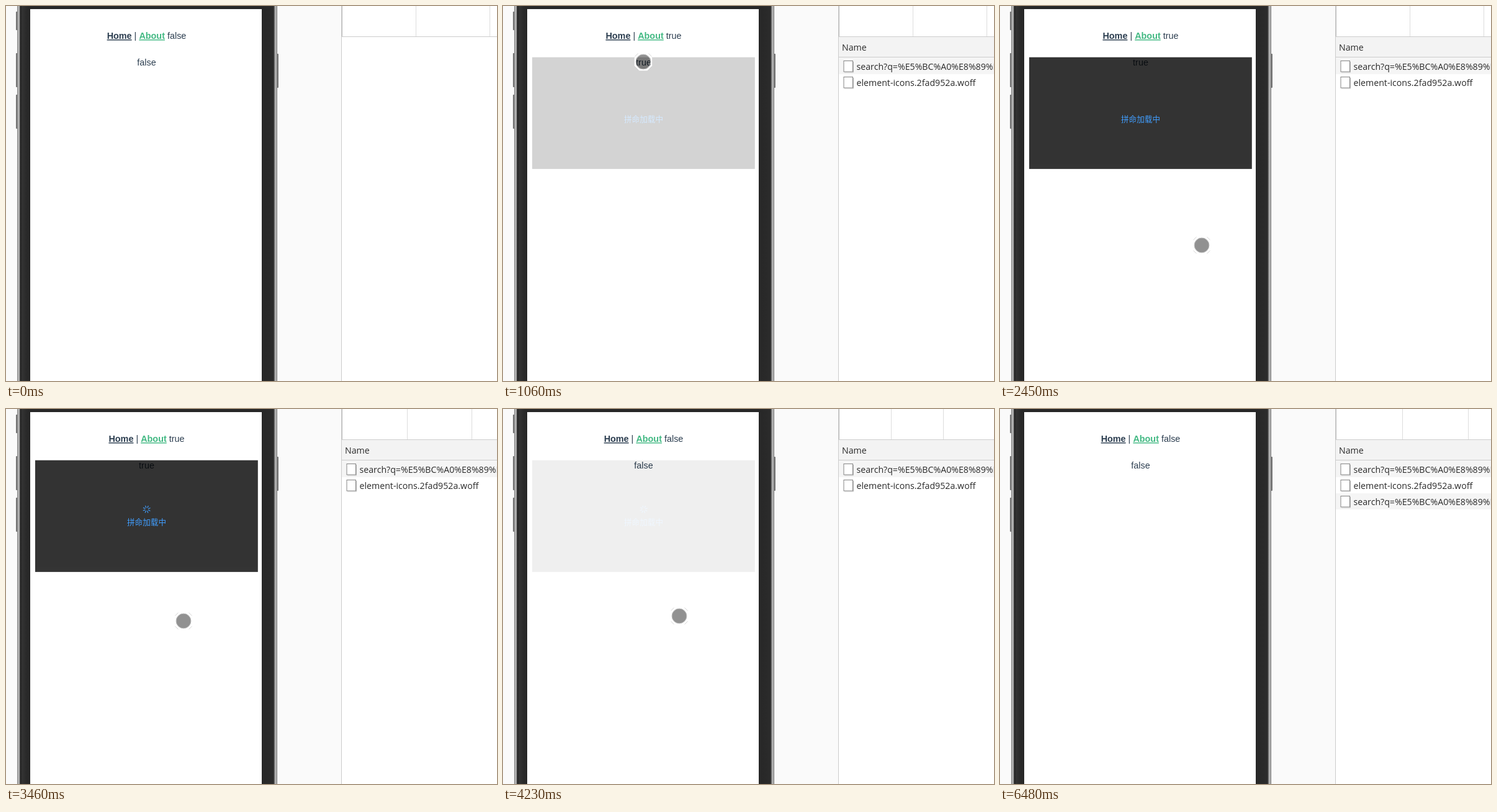
Write an HTML page that moves like this. It is 791 px wide and 605 px high and loops after 8270 ms.

```html
<!DOCTYPE html>
<html lang="en">
<head>
<meta charset="utf-8">
<title>Loading state demo</title>
<style>
  html, body { margin: 0; width: 100%; height: 100%; overflow: hidden; background: #fff; }
  svg { display: block; width: 791px; height: 605px; }
  .page { font: 14.4px "Liberation Sans", Arial, sans-serif; fill: #2c3e50; text-anchor: middle; }
  .link { font-weight: bold; text-decoration: underline; }
  .about { fill: #42b983; }
  .wait { font: 12.6px "Noto Sans CJK SC", "Noto Sans CJK", sans-serif; fill: #409eff; text-anchor: middle; }
  .list { font: 14.2px "Open Sans", "Noto Sans", sans-serif; fill: #2a2a2a; }
</style>
</head>
<body>
<svg viewBox="0 0 791 605">
  <defs>
    <linearGradient id="left">
      <stop offset="0" stop-color="#6e6e6e"/><stop offset=".07" stop-color="#b4b4b4"/>
      <stop offset=".18" stop-color="#a8a8a8"/><stop offset=".23" stop-color="#222"/>
      <stop offset=".4" stop-color="#333"/><stop offset=".65" stop-color="#2b2b2b"/>
      <stop offset="1" stop-color="#252525"/>
    </linearGradient>
    <linearGradient id="right">
      <stop offset="0" stop-color="#272727"/><stop offset=".76" stop-color="#2b2b2b"/>
      <stop offset=".8" stop-color="#555"/><stop offset=".86" stop-color="#aaa"/>
      <stop offset=".94" stop-color="#b4b4b4"/><stop offset="1" stop-color="#5a5a5a"/>
    </linearGradient>
    <g id="file">
      <rect x="549" y="5.5" width="14.5" height="17.5" fill="#fff" stroke="#858585"/>
      <path d="M550 24h14.5V7" fill="none" stroke="#bbb"/>
    </g>
  </defs>

  <rect width="540" height="605" fill="#fafafa"/>
  <g fill="#777">
    <rect x="16" y="9" width="4" height="30" rx="1"/>
    <rect x="16" y="76" width="4" height="55" rx="1"/>
    <rect x="16" y="143" width="4" height="55" rx="1"/>
    <rect x="434" y="77" width="5" height="55" rx="1"/>
  </g>
  <rect x="18" width="21" height="605" fill="url(#left)"/>
  <rect x="412" width="25" height="605" fill="url(#right)"/>
  <rect x="38" width="375" height="5" fill="#272727"/>
  <rect x="39" y="5" width="373" height="600" fill="#fff"/>

  <g class="page">
    <text x="226.5" y="53"><tspan class="link">Home</tspan> | <tspan class="link about">About</tspan> <tspan class="flag">false</tspan></text>
    <text x="226.5" y="96" class="flag">false</text>
  </g>
  <g id="mask">
    <rect x="47" y="82.7" width="358.8" height="180.2" fill="#000" fill-opacity=".8"/>
    <path id="spinner" stroke="#409eff" stroke-width="1.2" stroke-linecap="round"/>
    <text class="wait" x="226.5" y="187">拼命加载中</text>
  </g>

  <path d="M540.5 0V605M541 49.5H791" stroke="#ccc"/>
  <path d="M541.5 0V49" stroke="#bbb"/>
  <path id="grid" stroke="#ddd"/>

  <g id="list" class="list">
    <rect x="541" y="50" width="250" height="32" fill="#f3f3f3"/>
    <path d="M541 82.5H791" stroke="#ccc"/>
    <text x="546" y="72">Name</text>
    <rect x="541" y="83" width="250" height="27" fill="#f5f5f5"/>
    <use href="#file" y="83"/>
    <text x="569.5" y="103">search?q=%E5%BC%A0%E8%89%BA</text>
    <use href="#file" y="109"/>
    <text x="569.5" y="129">element-icons.2fad952a.woff</text>
    <g id="again">
      <rect x="541" y="136" width="250" height="26" fill="#f5f5f5"/>
      <use href="#file" y="135"/>
      <text x="569.5" y="155">search?q=%E5%BC%A0%E8%89%BA</text>
    </g>
  </g>

  <g id="touch">
    <path d="M-6-13H6L13-6V6L6 13H-6L-13 6V-6Z" fill="none" stroke="#fff" stroke-width="2.4"/>
    <path d="M-13.5-8.5l5-5M8.5-13.5l5 5M13.5 8.5l-5 5M-8.5 13.5l-5-5" stroke="#ccc" stroke-width=".8"/>
    <circle r="11.7" fill="#000" fill-opacity=".43"/>
    <circle r="11.9" fill="none" stroke="#b5b5b5"/>
  </g>
</svg>
<script>
const LOOP = 8270;
const $ = id => document.getElementById(id);
const clamp = u => Math.min(1, Math.max(0, u));
const easeOut = (u, power) => 1 - (1 - clamp(u)) ** power;

// Progress from 0 to 1 in n even, held steps
const stepped = (t, start, end, n) =>
  clamp(Math.floor((t - start) / (end - start) * (n - 1) + 0.1) / (n - 1));

// Latest entry of [time, value] pairs
const latest = (t, pairs) => pairs.filter(p => p[0] <= t).pop()[1];

// start, end, steps, easing power, from, control, to
const moves = [
  [70, 510, 7, 1.6, [475, 431], [340, 250], [224, 90]],
  [830, 980, 2, 1, [225, 88], [225, 89], [226, 90]],
  [1620, 2370, 11, 1.5, [230, 100], [490, 330], [355, 393]],
  [2450, 2680, 4, 1, [325, 386], [306, 372], [299, 351]],
  [3000, 3770, 11, 1, [299, 351], [283, 345], [284, 334]],
  [4460, 4920, 7, 1.5, [281, 318], [200, 160], [229, 96]],
  [5880, 6340, 7, 1, [235, 92], [450, 0], [708, 625]]
];
const spacings = [[0, 118.8], [3080, 104.5], [3850, 84], [5240, 134], [6480, 106.6]];

function touchAt(t) {
  const move = moves.filter(m => m[0] <= t).pop();
  if (!move || t >= 6340) return null;
  const [start, end, n, power, a, b, c] = move;
  const u = easeOut(stepped(t, start, end, n), power), v = 1 - u;
  return a.map((p, i) => v * v * p + 2 * u * v * b[i] + u * u * c[i]);
}

function maskOpacity(t) {
  if (t < 980 || t >= 4460) return 0;
  if (t < 3850) return easeOut((980 + 320 * stepped(t, 980, 1300, 5) - 1032) / 300, 2.5);
  return 1 - easeOut((3850 + 380 * stepped(t, 3850, 4230, 6) - 4038) / 300, 2.5);
}

const show = (id, on) => $(id).setAttribute("visibility", on ? "visible" : "hidden");

function draw(t) {
  const flag = String(t >= 980 && t < 4000);
  document.querySelectorAll(".flag").forEach(el => {
    if (el.textContent !== flag) el.textContent = flag;
  });

  $("mask").setAttribute("opacity", maskOpacity(t));
  show("spinner", t >= 3000);
  const tick = Math.floor(t / 77) * 77;
  $("spinner").setAttribute("transform", `translate(226.7 161.8) rotate(${tick * 0.18})`);

  show("list", t >= 980);
  show("again", t >= 5240);
  const gap = latest(t, spacings);
  let lines = "";
  for (let x = 541.5 + gap; x < 791; x += gap) lines += `M${Math.floor(x) + 0.5} 0V49`;
  $("grid").setAttribute("d", lines);

  const at = touchAt(t);
  show("touch", at);
  if (at) $("touch").setAttribute("transform", `translate(${at.map(Math.round)})`);
}

let spokes = "";
for (let i = 0; i < 8; i++) {
  const x = Math.cos(i * Math.PI / 4), y = Math.sin(i * Math.PI / 4);
  spokes += `M${3 * x} ${3 * y}L${5.8 * x} ${5.8 * y}`;
}
$("spinner").setAttribute("d", spokes);

const begin = performance.now();
function frame() {
  draw((performance.now() - begin) % LOOP);
  requestAnimationFrame(frame);
}
frame();
</script>
</body>
</html>
```
